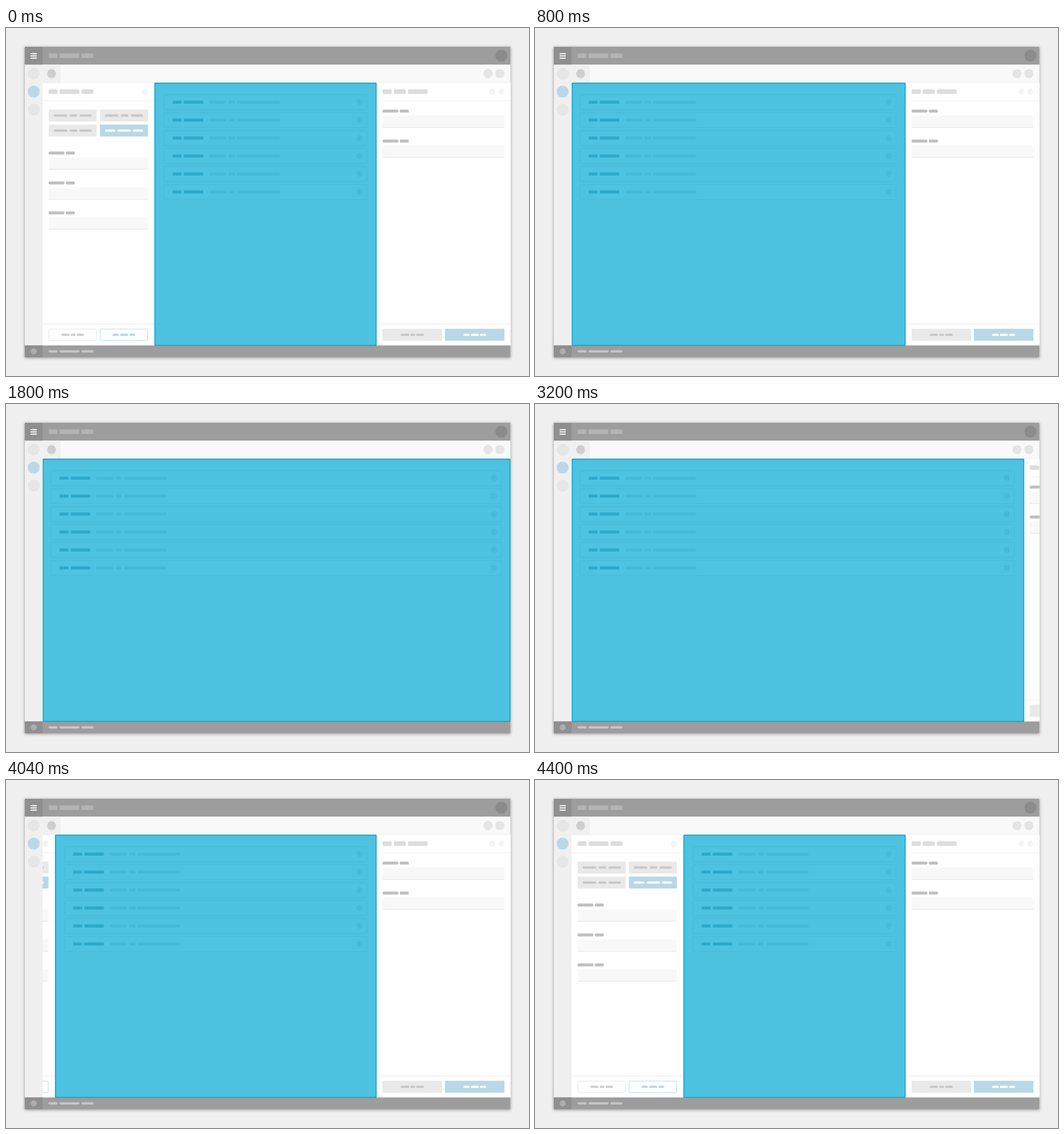
Recreate the animation shown at these times as an HTML page. Size 918 px wide and 610 px high, loop 5.4 s.

```html
<!DOCTYPE html>
<html lang="en">
<head>
<meta charset="utf-8">
<title>Collapsing side panels</title>
<style>
  @property --l { syntax: "<number>"; inherits: true; initial-value: 0; }
  @property --r { syntax: "<number>"; inherits: true; initial-value: 0; }

  html, body { margin: 0; width: 100%; height: 100%; overflow: hidden; background: #efefef; }
  svg {
    display: block; width: 100%; height: 100%;
    --x1: max(65.3px, 261.3px - var(--l) * 198.4px);
    --x2: min(884.6px, 649.7px + var(--r) * 236.6px);
    animation: left 5400ms infinite paused, right 5400ms infinite paused;
  }

  /* 0 = panel open, 1 = panel closed */
  @keyframes left {
    0%, 7.4074% { --l: 0; animation-timing-function: cubic-bezier(.333, 0, .833, .833); }
    14.8148% { --l: 1; animation-timing-function: linear; }
    74.0741% { --l: 1; animation-timing-function: cubic-bezier(.167, .167, .667, 1); }
    81.4815%, 100% { --l: 0; }
  }
  @keyframes right {
    0%, 25.9259% { --r: 0; animation-timing-function: cubic-bezier(.333, 0, .833, .833); }
    33.3333% { --r: 1; animation-timing-function: linear; }
    58.5185% { --r: 1; animation-timing-function: cubic-bezier(.167, .167, .667, 1); }
    65.9259%, 100% { --r: 0; }
  }

  .win { filter: drop-shadow(0 1px 2.5px rgba(0, 0, 0, .42)); }
  .left, .texts { transform: translateX(calc(var(--l) * -198.4px)); }
  .right, .dots { transform: translateX(calc(var(--r) * 236px)); }
  .main {
    x: var(--x1); width: calc(var(--x2) - var(--x1));
    fill: #4dc2e1; stroke: #08a7d4; stroke-width: 1.7px;
  }
  .card {
    x: calc(278px - var(--l) * 198.4px);
    width: calc(355.2px + var(--l) * 198.4px + var(--r) * 236px);
    fill: #4dc2e1;
    filter: drop-shadow(0 .5px 1.3px rgba(0, 130, 165, .26));
  }
</style>
</head>
<body>
<svg viewBox="0 0 918 610" preserveAspectRatio="none"></svg>
<script>
const svg = document.querySelector("svg");
const BLUE = "#b8d8e8", BUTTON = "#e9e9e9", CHIP = "#c8c8c8";
const TITLE = [[0, 15.7], [19.5, 34.5], [57.7, 21]];

const rect = (x, y, w, h, fill, rest = "") =>
  `<rect x="${x}" y="${y}" width="${w}" height="${h}" fill="${fill}" ${rest}/>`;
const dot = (x, y, r, fill) => `<circle cx="${x}" cy="${y}" r="${r}" fill="${fill}"/>`;
const bars = (x, y, h, fill, list) =>
  list.map(([dx, w]) => rect(x + dx, y, w, h, fill, 'rx="1.5"')).join("");
const repeat = (n, draw) => Array.from({ length: n }, (_, i) => draw(i)).join("");

const button = (x, y, w, fill, ink, list) =>
  rect(x, y, w, 21, fill, 'rx="1"') + bars(x, y + 8.5, 4, ink, list);
const outline = (x, y, w, line, ink, list) =>
  rect(x + .5, y + .5, w - 1, 20, "#fff", `rx="1" stroke="${line}"`) + bars(x, y + 8.5, 4, ink, list);
const field = (x, y, w) =>
  bars(x, y, 5.3, "#c0c0c0", [[0, 27.7], [30.2, 15.8]]) +
  rect(x, y + 10.5, w, 21, "#f8f8f8") + rect(x, y + 30.8, w, 1, "#e3e3e3");
const panel = (x, w) =>
  rect(x, 96, w, 461, "#fff") + rect(x, 127, w, 1, "#f1f1f1") +
  rect(x, 517.5, w, 1, "#f7f7f7") + rect(x, 518.5, w, 1, "#eeeeee");

const option = [[9, 23.5], [36.7, 13.5], [54.2, 21.5]];
const chosen = [[9, 18], [31, 23.3], [58.2, 17.5]];

const leftPanel =
  panel(64.3, 197) +
  bars(74.8, 107.6, 8, "#dcdcdc", TITLE) + dot(244, 111.6, 5.3, "#f4f4f4") +
  button(74.8, 143, 84.4, BUTTON, CHIP, option) +
  button(164.7, 143, 84.4, BUTTON, CHIP, option) +
  button(74.8, 169.2, 84.4, BUTTON, CHIP, option) +
  button(164.7, 169.2, 84.4, BLUE, "#fff", chosen) +
  repeat(3, i => field(74.8, 216.4 + i * 52.5, 174.3)) +
  outline(74.8, 527.3, 84.4, "#dfe5e6", "#cfcfcf", [[22.5, 14], [38.9, 8.2], [49.4, 12.6]]) +
  outline(164.7, 527.3, 84.4, BLUE, BLUE, [[22.5, 10.5], [35.6, 14], [52, 10]]);

const rightPanel =
  panel(650, 237) +
  bars(661, 107.6, 8, "#dcdcdc", [[0, 16], [19.7, 21], [44.5, 34.5]]) +
  dot(853.6, 111.6, 5.3, "#f4f4f4") + dot(869.4, 111.6, 5.3, "#f4f4f4") +
  repeat(2, i => field(661, 143 + i * 52.5, 213.8)) +
  button(661, 527.3, 104.4, BUTTON, CHIP, [[32.3, 14.2], [48.8, 8.2], [59.3, 12.7]]) +
  button(770.5, 527.3, 104.4, BLUE, "#fff", [[32.3, 11], [45.4, 14], [61.8, 10.2]]);

const header =
  rect(33, 33, 852.3, 31.5, "#9d9d9d") + rect(33, 33, 31.3, 31.5, "#8f8f8f") +
  repeat(3, i => rect(43.2, 44 + i * 3.9, 10.8, 1.9, "#fff")) +
  bars(74.8, 44.6, 8, "#b3b3b3", TITLE) + dot(869.5, 48.6, 10.5, "#8b8b8b");

const tabs =
  rect(64.3, 64.3, 821, 31.7, "#f9f9f9") + rect(64.3, 64.3, 31.6, 31.7, "#f0f0f0") +
  rect(64.3, 95.5, 821, .8, "#ebebeb") +
  dot(80, 80, 7.9, "#cfcfcf") + dot(846, 80, 8, "#e5e5e5") + dot(866.8, 80, 8, "#e5e5e5");

const sidebar =
  rect(33, 64.3, 31.3, 492.5, "#f0f0f0") +
  dot(48.6, 80, 10.5, "#e6e6e6") + dot(48.6, 111.6, 10.5, BLUE) + dot(48.6, 143, 10.5, "#e6e6e6");

const footer =
  rect(33, 556.4, 852.3, 20.8, "#9d9d9d") + rect(33, 556.4, 31.3, 20.8, "#8f8f8f") +
  dot(48.6, 566.8, 5.4, "#adadad") + bars(74.8, 564.8, 4, "#c6c6c6", TITLE);

const row = i => {
  const y = 129.8 + i * 31.5;
  return `<rect class="card" y="${y - 12.4}" height="25" rx="1"/>` +
    `<g class="texts">` +
    bars(292.4, y - 2.6, 5.3, "#2ca8ca", [[0, 15.7], [19.6, 34.3]]) +
    bars(356.6, y - 2.6, 5.3, "#45b9d9", [[0, 30.3], [34.3, 10.7], [48.8, 75]]) +
    `</g><g class="dots">${dot(620.4, y, 5.2, "#46bad9")}</g>`;
};

svg.innerHTML =
  `<clipPath id="body">${rect(64, 96, 821.8, 461, "#000")}</clipPath>` +
  rect(33, 33, 852.3, 544.2, "#fff", 'class="win"') +
  `<g clip-path="url(#body)"><g class="left">${leftPanel}</g><g class="right">${rightPanel}</g></g>` +
  header + tabs + sidebar + footer +
  `<rect class="main" y="96.7" height="459.6" rx=".6"/>` + repeat(6, row);

// The motion advances in 40 ms ticks.
const motions = svg.getAnimations();
function tick() {
  const t = Math.floor(performance.now() % 5400 / 40) * 40;
  for (const m of motions) m.currentTime = t;
  requestAnimationFrame(tick);
}
tick();
</script>
</body>
</html>
```
